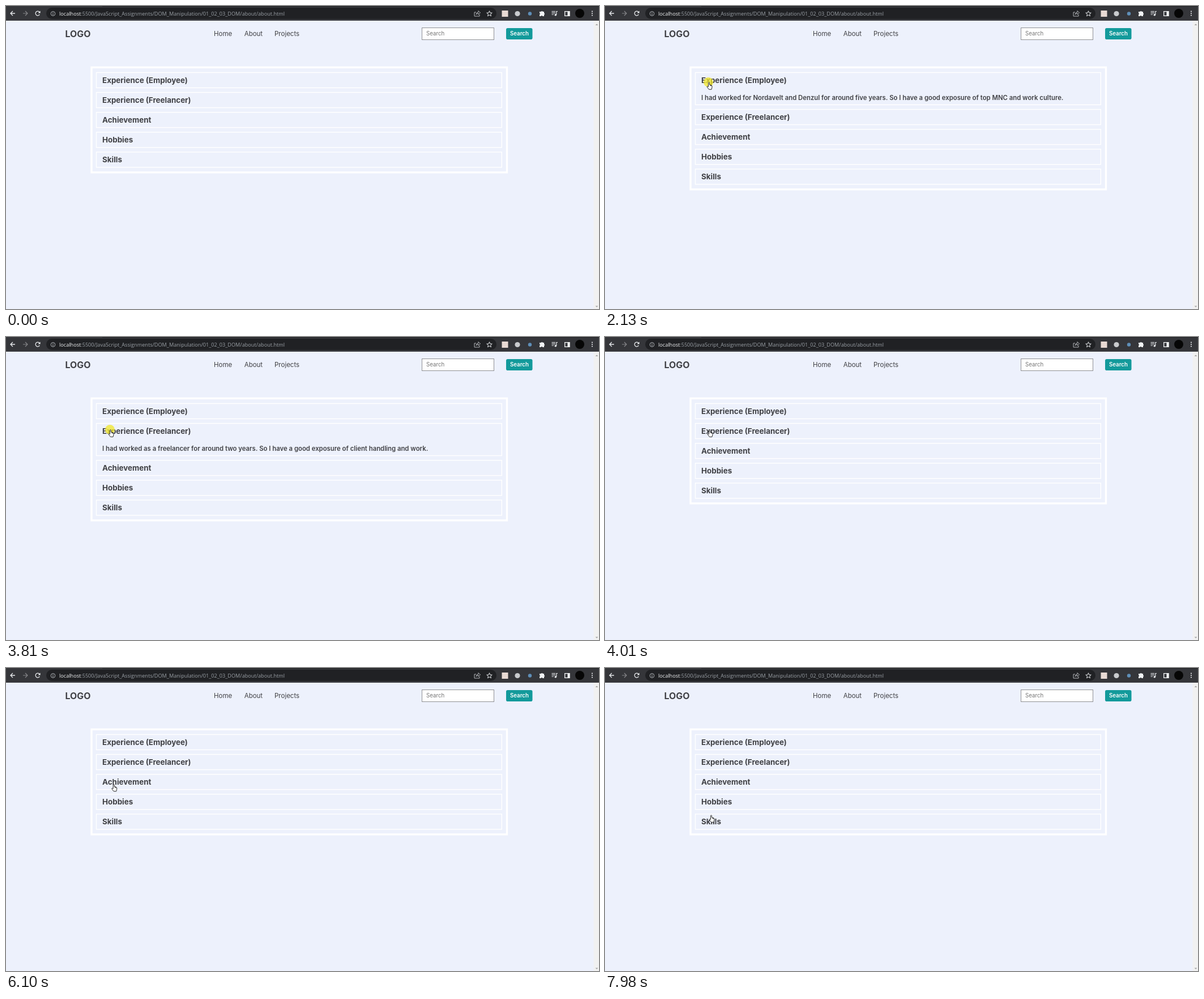
An HTML page with a canvas that plays this animation: 1047x535 px, repeating every 8 s.

```html
<!DOCTYPE html>
<html lang="en">
<head>
<meta charset="utf-8">
<title>Accordion</title>
<style>
  html, body { margin: 0; width: 100%; height: 100%; overflow: hidden; background: #edf1fc; }
  canvas { display: block; width: 1047px; height: 535px; }
</style>
</head>
<body>
<canvas id="stage"></canvas>
<script>
const W = 1047, H = 535, LOOP = 8000;
const canvas = document.getElementById('stage');
const ctx = canvas.getContext('2d');
const ratio = window.devicePixelRatio || 1;
canvas.width = Math.round(W * ratio);
canvas.height = Math.round(H * ratio);

const INK = '#404145', PALE = '#e8eaed';
const UI = 'Inter, "Open Sans", sans-serif';
const SYS = '"Open Sans", "Noto Sans", sans-serif';

const items = [
  { title: 'Experience (Employee)', lines: ['I had worked for Nordavelt and Denzul for around five years. So I have a good exposure of top MNC and work culture.'] },
  { title: 'Experience (Freelancer)', lines: ['I had worked as a freelancer for around two years. So I have a good exposure of client handling and work.'] },
  { title: 'Achievement', lines: [
    'I have been awarded with best influencer of 2021. I am also one of the top contributor of the open source projects over the',
    'Vorlub, which can be seen in my Vorlub profile.'] },
  { title: 'Hobbies', lines: ['Some of my popular hobbies are travelling and exploring the new technologies from all over the world.'] },
  { title: 'Skills', lines: [] }
];

// When each panel is open: item index, start, end
const openings = [[0, 1720, 2330], [1, 3350, 4010], [2, 5160, 5760], [3, 6840, 7570]];

// When the mouse button is held
const presses = [[1450, 1650], [2130, 2330], [3150, 3350], [3810, 4010],
  [4880, 5160], [5560, 5760], [6640, 6840], [7370, 7570]];

// Pointer path: start, end, number of steps, target x, target y, vertical bend
const moves = [
  [180, 180, 1, 804, 433, 0],
  [240, 240, 1, 769, 426, 0],
  [510, 650, 3, 290, 293, -55],
  [850, 1050, 4, 183.5, 134.5, 0],
  [1190, 1190, 1, 182.5, 134.5, 0],
  [2600, 2880, 5, 183.5, 163.5, 0],
  [4280, 4620, 6, 189.5, 201.5, 0],
  [6100, 6370, 5, 186.5, 234.5, 0],
  [7770, 7980, 4, 186.5, 259.5, 0]
];

const during = (t, a, b) => t >= a && t < b;

function pointerAt(t) {
  if (t < moves[0][0]) return null;
  let x = moves[0][3], y = moves[0][4];
  for (const [start, end, n, tx, ty, bend] of moves) {
    if (t < start) break;
    const gap = n > 1 ? (end - start) / (n - 1) : 1;
    const k = Math.min(n, Math.floor((t - start) / gap + 0.001) + 1);
    const u = k / n, e = u * u * (3 - 2 * u);
    x += (tx - x) * e;
    y += (ty - y) * e + bend * 4 * u * (1 - u);
  }
  return { x, y };
}

function rect(x, y, w, h, fill, radius = 0) {
  ctx.fillStyle = fill;
  ctx.beginPath();
  ctx.roundRect(x, y, w, h, radius);
  ctx.fill();
}

function frame(x, y, w, h, color, line) {
  ctx.strokeStyle = color;
  ctx.lineWidth = line;
  ctx.strokeRect(x + line / 2, y + line / 2, w - line, h - line);
}

function disc(x, y, r, fill) {
  ctx.fillStyle = fill;
  ctx.beginPath();
  ctx.arc(x, y, r, 0, Math.PI * 2);
  ctx.fill();
}

function ring(x, y, r, a0, a1, color, line) {
  ctx.strokeStyle = color;
  ctx.lineWidth = line;
  ctx.beginPath();
  ctx.arc(x, y, r, a0, a1);
  ctx.stroke();
}

function text(str, x, y, weight, size, color, family = UI) {
  ctx.font = `${weight} ${size}px ${family}`;
  ctx.fillStyle = color;
  ctx.fillText(str, x, y);
}

// Path drawn at an offset, with optional fill and stroke
function shape(d, x, y, fill, stroke, line = 1) {
  const p = new Path2D(d);
  ctx.save();
  ctx.translate(x, y);
  if (fill) { ctx.fillStyle = fill; ctx.fill(p); }
  if (stroke) { ctx.strokeStyle = stroke; ctx.lineWidth = line; ctx.stroke(p); }
  ctx.restore();
}

function drawBrowser() {
  rect(0, 0, W, 26, '#35363a');
  rect(170, 0, W - 170, 1, '#202124');
  rect(0, 25, W, 1, '#4a4b4f');
  shape('M4 0H-4M0-4L-4 0L0 4', 12, 13, null, PALE, 1.3);
  shape('M-4 0H4M0-4L4 0L0 4', 34, 13, null, '#86878a', 1.2);
  ring(56, 13, 3.8, 0.5, 5.6, PALE, 1.3);
  shape('M4.6-4.6V-.6H.6Z', 56, 13, PALE);

  rect(71, 3, 795, 20, '#202124', 10);
  ring(83, 13.5, 3.8, 0, Math.PI * 2, '#bdc1c6', 0.9);
  rect(82.5, 13, 1, 2.7, '#bdc1c6');
  rect(82.5, 11.3, 1, 1, '#bdc1c6');
  const host = 'localhost';
  text(host, 94, 17, 400, 9.13, '#f1f3f4', SYS);
  const hostW = ctx.measureText(host).width;
  text(':5500/JavaScript_Assignments/DOM_Manipulation/01_02_03_DOM/about/about.html',
    94 + hostW, 17, 400, 9.13, '#9aa0a6', SYS);

  shape('M-2-2H-5V5H4V2M-2 2Q-1.5-2 2-2V-4.5L5.5-1L2 2V0Q-.5 0-2 2Z', 832, 13, null, '#c4c7cb', 0.9);
  let star = '';
  for (let i = 0; i < 10; i++) {
    const a = -Math.PI / 2 + i * Math.PI / 5, r = i % 2 ? 2.2 : 5;
    star += (i ? 'L' : 'M') + (r * Math.cos(a)).toFixed(2) + ' ' + (r * Math.sin(a)).toFixed(2);
  }
  shape(star + 'Z', 853.5, 13.7, null, PALE, 1);

  rect(875.5, 8, 11, 11, '#e8dad4');
  disc(903, 13.5, 4.6, '#c9cbce');
  disc(925, 13.5, 3.2, '#5f8fb8');
  shape('M-4.5-3H-1.7A1.6 1.6 0 0 1 1.3-3H3.5V-.5A1.6 1.6 0 0 1 3.5 2.5V5H.9A1.5 1.5 0 0 0-2 5H-4.5V2.2A1.5 1.5 0 0 0-4.5-.6Z', 946.5, 13, '#f1f3f4');
  shape('M-5-3.5H1.5M-5-.8H1.5M-5 2H-1.5M3.3 2.5V-3.5H5.5', 968.5, 13, null, PALE, 1.2);
  disc(970.3, 15.7, 1.8, PALE);
  frame(986, 9, 9.5, 9, '#f1f3f4', 1.3);
  rect(991.5, 9, 4, 9, '#f1f3f4');
  disc(1013, 13, 8, '#060606');
  for (const y of [9.5, 13, 16.5]) disc(1035, y, 1.1, PALE);
}

function drawPage() {
  rect(0, 26, W, H - 26, '#edf1fc');
  rect(1037.5, 26, 9.5, H - 26, '#f1f1f1');
  shape('M-2.4 1.3L0-1.3L2.4 1.3Z', 1043, 32.8, '#a3a3a3');
  shape('M-2.4-1.3L0 1.3L2.4-1.3Z', 1043, 530.8, '#a3a3a3');

  text('LOGO', 104.5, 54.7, 700, 15.9, INK);
  text('Home', 367, 53.2, 400, 11.5, INK);
  text('About', 420.7, 53.2, 400, 11.5, INK);
  text('Projects', 474, 53.2, 400, 11.5, INK);

  rect(734, 38, 128, 22, '#ffffff', 1);
  frame(734, 38, 128, 22, '#8f9094', 1);
  text('Search', 742, 52.4, 400, 9.7, '#757575');
  rect(883, 39, 46.5, 20, '#139a9b', 2.8);
  text('Search', 890, 52.4, 600, 9.7, '#ffffff');
}

function drawAccordion(t) {
  const open = openings.find(o => during(t, o[1], o[2]));
  let y = 116.8;
  items.forEach((item, i) => {
    const lines = open && open[0] === i ? item.lines : [];
    const extra = lines.length ? 13.4 + 16.6 * lines.length : 0;
    frame(158.8, y, 717.2, 28.3 + extra, '#ffffff', 1.4);
    text(item.title, 170, y + 18.9, 700, 13.4, INK);
    lines.forEach((line, n) => text(line, 170, y + 49.4 + n * 16.6, 600, 11.34, INK));
    y += 35.1 + extra;
  });
  frame(149.3, 106.7, 736.9, y - 106.7 + 3.2, '#ffffff', 3.4);
}

function drawPointer(t) {
  const p = pointerAt(t);
  if (!p) return;
  if (presses.some(s => during(t, s[0], s[1]))) disc(p.x, p.y, 8.5, 'rgba(240,230,40,0.75)');
  const row = p.y - 116.8;
  if (row < 169 && row % 35.1 < 28.3) {
    shape('M3 8.6V1.6Q4 .2 5 1.6V5Q9.4 5.4 9.5 7.4L9.4 10L8.5 13.3H4L.6 8.8Q.6 7.4 2 8ZM6.5 5.4V7.3M8 5.8V7.4',
      p.x - 3, p.y - 0.5, '#ffffff', '#111111', 0.9);
  } else {
    shape('M.4 .4V9L2.4 7.2L3.8 10.4L5 9.9L3.7 6.8L6.6 6.6Z', p.x, p.y, '#ffffff', '#111111', 0.7);
  }
}

let origin = null;
function draw(now) {
  if (origin === null) origin = now;
  const t = (now - origin) % LOOP;
  ctx.setTransform(ratio, 0, 0, ratio, 0, 0);
  ctx.textBaseline = 'alphabetic';
  drawPage();
  drawAccordion(t);
  drawBrowser();
  drawPointer(t);
  requestAnimationFrame(draw);
}
requestAnimationFrame(draw);
</script>
</body>
</html>
```
